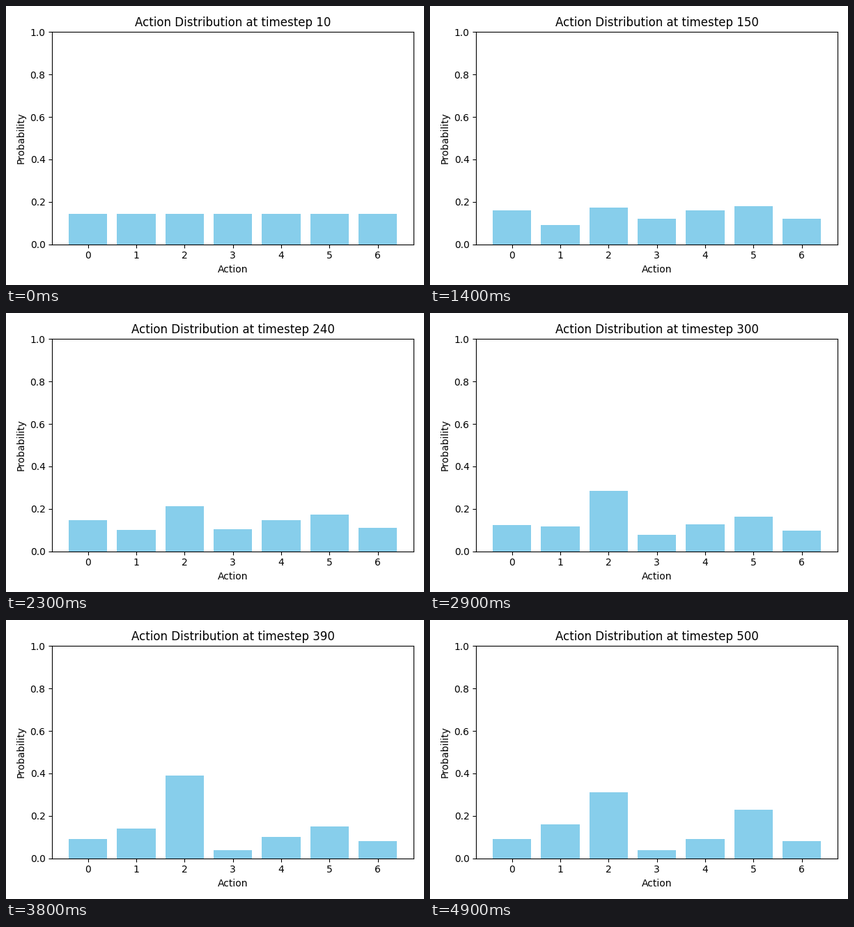
Recreate the animation shown at these times as a matplotlib script. Size 600 by 400 pixels, loop 5000 ms.

```python
import numpy as np
import matplotlib.pyplot as plt
from matplotlib.animation import FuncAnimation

FRAMES = 50
INTERVAL = 100  # ms
STEP = 10       # timesteps per frame
ACTIONS = 7

# The policy starts uniform, then drifts towards each stage in turn.
STAGE_TIMES = [10, 90, 350, 500]
UNIFORM = np.full(ACTIONS, 1 / ACTIONS)
EARLY = np.array([16, 9, 17, 12, 16, 18, 12]) / 100
PEAKED = np.array([9, 14, 39, 4, 10, 15, 8]) / 100
FINAL = np.array([9, 16, 31, 4, 9, 23, 8]) / 100
STAGES = [UNIFORM, EARLY, PEAKED, FINAL]


def ease_in(u):
    return u ** 3


def probabilities(timestep):
    position = np.interp(timestep, STAGE_TIMES, range(len(STAGES)))
    stage = min(int(position), len(STAGES) - 2)
    start, end = STAGES[stage:stage + 2]
    return start + (end - start) * ease_in(position - stage)


def title_text(timestep):
    return f"Action Distribution at timestep {timestep}"


fig, ax = plt.subplots(figsize=(6, 4), dpi=100)
bars = ax.bar(range(ACTIONS), probabilities(STEP), color="skyblue")
ax.set_ylim(0, 1)
ax.set_xlabel("Action")
ax.set_ylabel("Probability")
title = ax.set_title(title_text(STEP))
fig.tight_layout()


def update(frame):
    timestep = STEP * (frame + 1)
    for bar, height in zip(bars, probabilities(timestep)):
        bar.set_height(height)
    title.set_text(title_text(timestep))
    return [*bars, title]


anim = FuncAnimation(fig, update, frames=FRAMES, interval=INTERVAL,
                     repeat=True, repeat_delay=0, blit=False)
plt.show()
```
